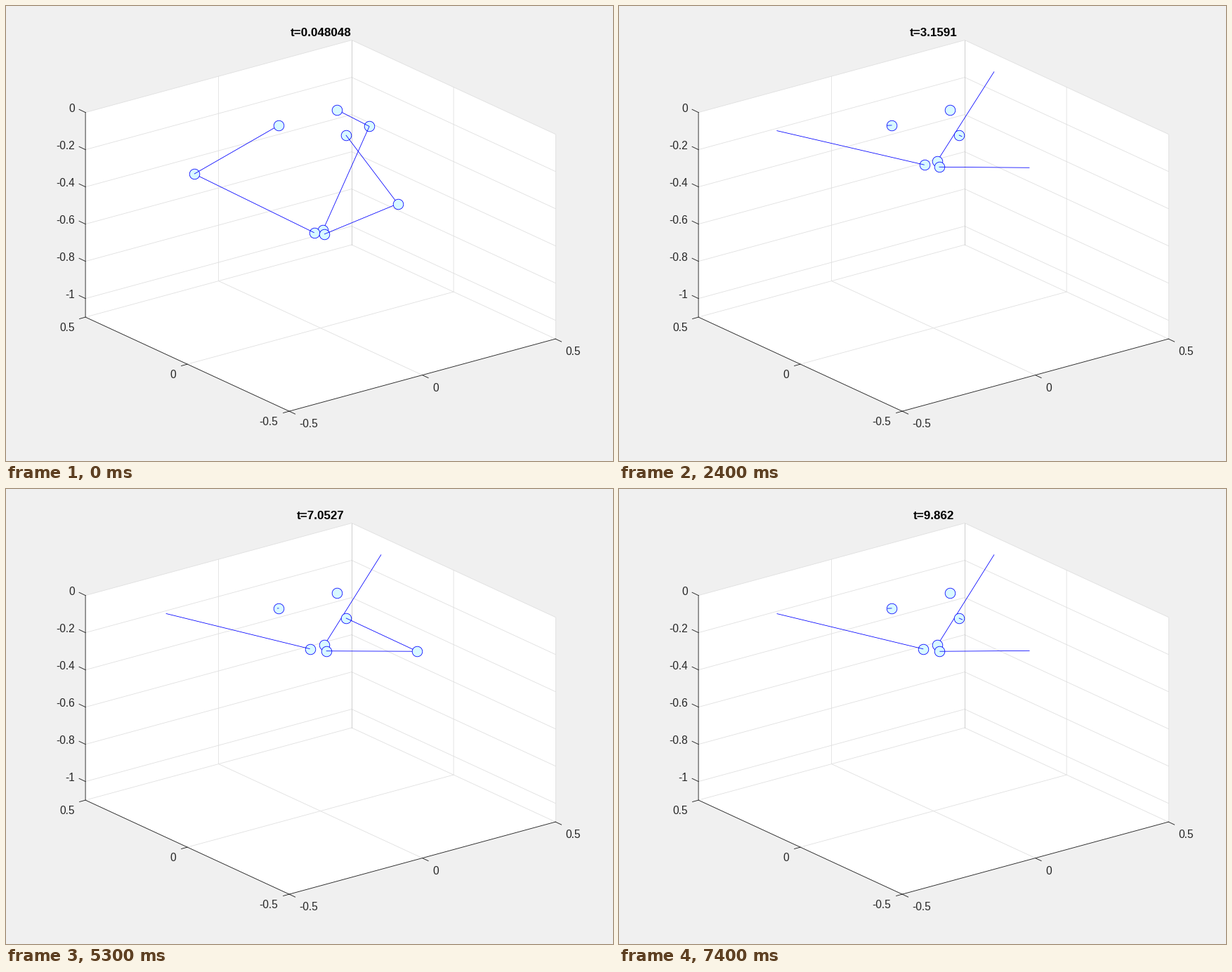
Write a matplotlib script that moves like this. It is 864 by 648 pixels and loops after 7450 ms.

```python
import numpy as np
import matplotlib.pyplot as plt
from matplotlib.animation import FuncAnimation

W, H, DPI = 864, 648, 100
FRAMES, STEP = 149, 50
PX = 72 / DPI
plt.rcParams["font.family"] = "Liberation Sans"

BLUE, FACE, INK, GRID = "#0000ff", "#d8faff", "#262626", "#dfdfdf"
BASE_R, UPPER, LOWER = 0.125, 0.35, 0.5
Z_TOP, Z_LOW = 8e-5, -1.1
LEG_ANGLES = (150, 30, -90)
SWAY_ANGLE = 120

fig = plt.figure(figsize=(W / DPI, H / DPI), dpi=DPI, facecolor="#f0f0f0")
ax = fig.add_axes([0, 0, 1, 1])
ax.set_xlim(-0.5, W - 0.5)
ax.set_ylim(H - 0.5, -0.5)
ax.axis("off")


def project(p):
    x, y, z = p
    return np.array([447.1 + 379 * x - 290 * y,
                     166.6 - 103 * x - 134 * y - 265 * z])


def depth(p):
    """Nearness to the camera (azimuth -37.5, elevation 30)."""
    return p[0] * -0.527 + p[1] * -0.687 + p[2] * 0.5


# ---- static axes box ----
def path(*pts, color=GRID, lw=0.8, z=1):
    xy = np.array([project(p) for p in pts])
    ax.plot(xy[:, 0], xy[:, 1], color=color, lw=lw * PX, zorder=z)


def tick(p, dx, dy, text, tx, ty, ha):
    x, y = project(p)
    ax.plot([x, x + dx], [y, y + dy], color=INK, lw=0.9 * PX, zorder=3)
    ax.text(x + tx, y + ty + 5.5, text, color=INK, fontsize=15.5 * PX,
            ha=ha, va="baseline", zorder=3)


h = 0.5
outline = [(-h, h, 0), (h, h, 0), (h, -h, 0),
           (h, -h, Z_LOW), (-h, -h, Z_LOW), (-h, h, Z_LOW)]
ax.fill(*np.array([project(p) for p in outline]).T, color="white", lw=0, zorder=0)

for k in range(6):
    z = -0.2 * k
    path((-h, h, z), (h, h, z), (h, -h, z))
    tick((-h, h, z), -9, -4.3, f"{z:.1g}" if k else "0", -15.5, -6.5, "right")
path((-h, h, Z_LOW), (h, h, Z_LOW), (h, -h, Z_LOW))
path((0, h, 0), (0, h, Z_LOW), (0, -h, Z_LOW))
path((h, 0, 0), (h, 0, Z_LOW), (-h, 0, Z_LOW))
path((h, -h, 0), (h, -h, Z_LOW))
path((h, h, 0), (h, h, Z_LOW), color="#c4c4c4")
path((-h, h, 0), (-h, h, Z_LOW), (-h, -h, Z_LOW), (h, -h, Z_LOW),
     color=INK, lw=0.9, z=2)
for v in (-h, 0, h):
    tick((v, -h, Z_LOW), 8.5, 4, f"{v:g}", 14.5, 17.5, "left")
    tick((-h, v, Z_LOW), -8.5, 2.4, f"{v:g}", -15.7, 14.5, "right")

title = ax.text(447.3, 42.5, "", color="black", weight="bold",
                fontsize=17 * PX, ha="center", va="baseline", zorder=30)


# ---- motion ----
def clock(i):
    """Simulated seconds; playback speed wanders a little."""
    return np.interp(i, [0, 15, 48, 75, 106, 118, 148],
                     [0.048048, 0.9379, 3.1591, 4.8785, 7.0527, 8.0033, 9.862])


def pulse(t, mid, width):
    return np.exp(-((t - mid) / width) ** 2)


def sway(t):
    """Sideways drift of the platform along SWAY_ANGLE."""
    return (0.008 * pulse(t, 1.4, 0.3) - 0.004 * pulse(t, 2.1, 0.25)
            + 0.004 * pulse(t, 5.6, 0.3) + 0.0055 * pulse(t, 8, 0.97))


def platform(t):
    """Radius and height while the elbows rise, critically damped, to level."""
    x = t / 0.22
    rise = 0.0018 - 0.247 * (1 + x) * np.exp(-x)
    radius = 0.0305 - 0.012 * np.exp(-t / 2.4)
    elbow = BASE_R + np.sqrt(UPPER**2 - rise**2)
    return radius, rise - np.sqrt(LOWER**2 - (elbow - radius) ** 2)


def leg_points(angle, t):
    """Base, elbow and foot, by intersecting the two link circles."""
    radius, z = platform(t)
    foot = np.array([radius + sway(t) * np.cos(np.radians(angle - SWAY_ANGLE)), z])
    base = np.array([BASE_R, 0])
    d = np.hypot(*(foot - base))
    along = (foot - base) / d
    out = np.array([-along[1], along[0]])
    a = (UPPER**2 - LOWER**2 + d**2) / (2 * d)
    elbow = base + a * along + np.sqrt(UPPER**2 - a**2) * out
    c, s = np.cos(np.radians(angle)), np.sin(np.radians(angle))
    return [np.array([r * c, r * s, q]) for r, q in (base, elbow, foot)]


def clip(p, q):
    """Cut the segment at the top of the box."""
    if p[2] > q[2]:
        p, q = q, p
    if q[2] > Z_TOP:
        q = p + (q - p) * (Z_TOP - p[2]) / (q[2] - p[2])
    return p, q


def disc():
    return ax.plot([], [], "o", ms=14.6 * PX, mfc=FACE, mec=BLUE,
                   mew=0.8 * PX, snap=False)[0]


def rod():
    return ax.plot([], [], color=BLUE, lw=0.8 * PX, snap=False,
                   solid_capstyle="butt")[0]


parts = [([disc() for _ in range(3)], [rod() for _ in range(2)])
         for _ in LEG_ANGLES]


def put(artist, pts, order):
    xy = np.array([project(p) for p in pts])
    artist.set_data(xy[:, 0], xy[:, 1])
    artist.set_zorder(10 + order)


def update(i):
    t = clock(i)
    title.set_text(f"t={t:.5g}")
    for angle, (discs, rods) in zip(LEG_ANGLES, parts):
        pts = leg_points(angle, t)
        for p, m in zip(pts, discs):
            put(m, [p], depth(p))
            m.set_visible(p[2] <= Z_TOP)
        for p, q, line in zip(pts, pts[1:], rods):
            put(line, clip(p, q), (depth(p) + depth(q)) / 2)
    return []


anim = FuncAnimation(fig, update, frames=FRAMES, interval=STEP,
                     init_func=lambda: update(0), repeat=True,
                     repeat_delay=0, blit=False)
plt.show()
```
